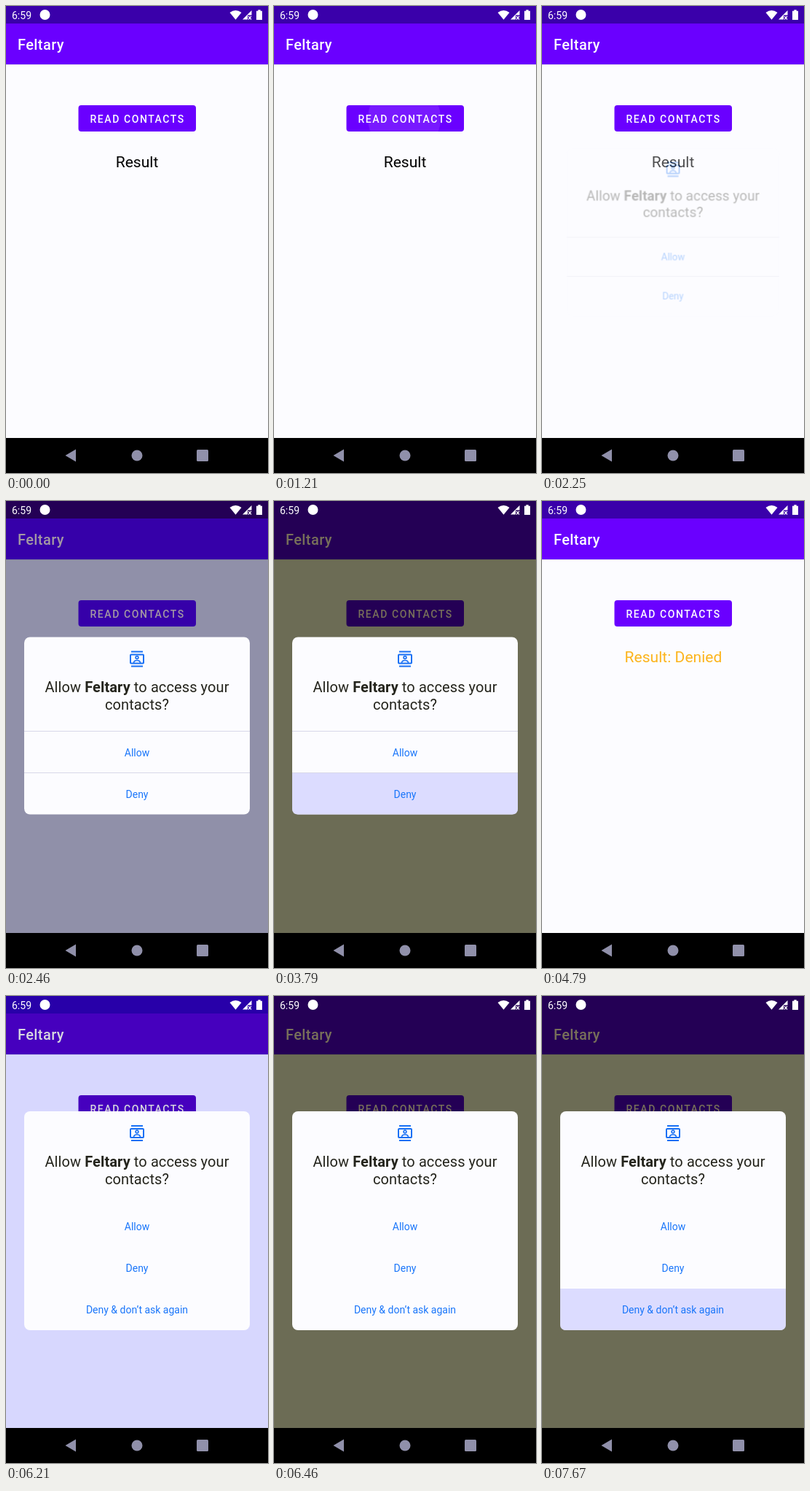
An HTML page that plays this animation: 360x640 px, repeating every 8 s.

```html
<!DOCTYPE html>
<html lang="en">
<head>
<meta charset="utf-8">
<title>Permission request</title>
<style>
  html, body { margin: 0; width: 100%; height: 100%; overflow: hidden; background: #000; }
  svg { display: block; width: 100vw; height: 100vh; font-family: Roboto, sans-serif; }
  .dialog { transform-box: fill-box; transform-origin: center; opacity: 0; }
  .middle { text-anchor: middle; }
  .title { font-size: 20px; letter-spacing: .1px; fill: #24241c; }
  .choice { font-size: 14px; fill: #1a76fa; }
  .result { font-size: 21px; letter-spacing: .03px; }
  .ripple { opacity: 0; }
</style>
</head>
<body>
<svg viewBox="0 0 360 640">
  <defs>
    <clipPath id="buttonClip"><rect x="99.5" y="136" width="161.5" height="36" rx="4"/></clipPath>
    <g id="contacts" fill="none" stroke="#1870f4" stroke-width="2">
      <path d="M172 206.5h16M172 226.5h16"/>
      <rect x="171" y="210.5" width="18" height="12" rx="1"/>
      <circle cx="180" cy="214.5" r="1.9" stroke-width="1.6"/>
      <path d="M175.5 222c0-4.6 9-4.6 9 0" stroke-width="1.6"/>
    </g>
  </defs>

  <rect class="page" width="360" height="640"/>
  <rect class="bar" y="24" width="360" height="56"/>
  <rect y="80" width="360" height="1" fill="#000" opacity=".08"/>
  <rect class="status" width="360" height="24"/>
  <text class="label" x="16" y="60" font-size="20" font-weight="500" letter-spacing=".4">Feltary</text>

  <rect class="bar" x="99.5" y="136" width="161.5" height="36" rx="4"/>
  <g clip-path="url(#buttonClip)">
    <g transform="translate(179 154)" id="buttonRipples" fill="#fff"></g>
  </g>
  <text class="label" x="115.5" y="160" font-size="14" font-weight="500" letter-spacing="1.57">READ CONTACTS</text>

  <text class="result middle" id="pending" x="180" y="220.5">Result</text>
  <text class="result middle" id="denied" x="180.5" y="220.5">Result: Denied</text>

  <g fill="#fff">
    <text x="8" y="17.5" font-size="14">6:59</text>
    <circle cx="53.5" cy="12" r="7"/>
    <path d="M307.5 9Q315.5 2.8 323.5 9L315.5 18.8Z"/>
    <path d="M325 18.5L337.5 6V12.5H332V18.5Z"/>
    <path d="M333 14l4 4.5M337 14l-4 4.5" stroke="#fff" stroke-width="1.2"/>
    <path d="M344 6.8h2.3V5.2h3.4v1.6h2.3V19h-8Z"/>
  </g>

  <g id="dialogs"></g>

  <rect y="592" width="360" height="48"/>
  <g fill="#9090aa">
    <path d="M81.5 616L96 607.5V624.5Z"/>
    <circle cx="180" cy="616" r="7.5"/>
    <rect x="262" y="608" width="16" height="16" rx="1.5"/>
  </g>
</svg>
<script>
const LOOP = 8000;
const $ = selector => document.querySelector(selector);

// steps: [time in ms, value, optional easing towards the next step]
function play(el, property, steps) {
  const last = steps[steps.length - 1];
  const full = last[0] < LOOP ? [...steps, [LOOP, last[1]]] : steps;
  const frames = full.map(([time, value, easing = 'linear']) =>
    ({ offset: time / LOOP, [property]: value, easing }));
  if (frames[0].offset > 0) frames.unshift({ ...frames[0], offset: 0, easing: 'linear' });
  el.animate(frames, { duration: LOOP, iterations: Infinity });
}

// Colours at four depths of the dialog scrim
const shades = {
  '.page': ['#fcfcff', '#d8d8ff', '#9090aa', '#6c6c55'],
  '.bar': ['#6a00ff', '#4600be', '#3600aa', '#240055'],
  '.status': ['#3a00aa', '#2800aa', '#240055', '#240055'],
  '.label': ['#fcfcff', '#d8d8e0', '#a498a4', '#78705a'],
  '#denied': ['#fcb41c', '#d89000', '#906c00', '#6c4800']
};
const depth = [
  [0, 0], [2300, 0], [2380, 1], [2460, 2], [2560, 3],
  [4070, 3], [4140, 2], [4220, 1], [4300, 0],
  [6130, 0], [6210, 1], [6290, 2], [6390, 3]
];
for (const [selector, colors] of Object.entries(shades)) {
  for (const el of document.querySelectorAll(selector))
    play(el, 'fill', depth.map(([time, level]) => [time, colors[level]]));
}

play($('#pending'), 'opacity', [[0, 1], [4060, 1], [4060, 0]]);
play($('#denied'), 'opacity', [[0, 0], [4060, 0], [4060, 1]]);

function ripple(parent, start, from, to, alpha, released) {
  parent.insertAdjacentHTML('beforeend', '<circle class="ripple" r="1"/>');
  const circle = parent.lastElementChild;
  play(circle, 'transform', [
    [start, `scale(${from})`, 'cubic-bezier(.4,0,.2,1)'], [start + 225, `scale(${to})`]
  ]);
  const fade = [[start, 0], [start + 75, alpha]];
  if (released) fade.push([start + 200, alpha], [start + 350, 0]);
  play(circle, 'opacity', fade);
}

ripple($('#buttonRipples'), 1180, 48, 84, .24, true);
ripple($('#buttonRipples'), 5240, 48, 84, .24, true);

function dialog({ id, top, choices, lines, opens, closes, pressed }) {
  const height = 129 + 57 * choices.length;
  const rowTop = i => top + 129 + 57 * i;
  const pressedTop = rowTop(choices.length - 1);
  $('#dialogs').insertAdjacentHTML('beforeend', `
    <g class="dialog" id="${id}">
      <clipPath id="${id}Clip"><path d="M25 ${pressedTop}h310v49q0 8-8 8H33q-8 0-8-8Z"/></clipPath>
      <rect x="25" y="${top}" width="310" height="${height}" rx="8" fill="#fcfcff"/>
      <g clip-path="url(#${id}Clip)">
        <g class="touch" transform="translate(180 ${pressedTop + 28.5})" fill="#d8d8ff"></g>
      </g>
      ${lines ? choices.map((_, i) =>
        `<rect x="25" y="${rowTop(i) - .5}" width="310" height="1" fill="#d8d8e8"/>`).join('') : ''}
      <use href="#contacts" y="${top - 186.5}"/>
      <text class="title middle" x="180" y="${top + 75.5}">Allow <tspan font-weight="700">Feltary</tspan> to access your</text>
      <text class="title middle" x="180" y="${top + 99.5}">contacts?</text>
      ${choices.map((text, i) =>
        `<text class="choice middle" x="180" y="${rowTop(i) + 34}">${text}</text>`).join('')}
    </g>`);
  const el = $('#' + id);
  const fade = [[opens, 0], [opens + 130, 1]];
  if (closes) fade.push([closes, 1], [closes + 120, 0]);
  play(el, 'opacity', fade);
  play(el, 'transform', [[opens, 'scale(.9)', 'ease-out'], [opens + 150, 'scale(1)']]);
  ripple(el.querySelector('.touch'), pressed, 93, 160, .9, false);
}

dialog({
  id: 'firstAsk', top: 186.5, lines: true, choices: ['Allow', 'Deny'],
  opens: 2210, closes: 4040, pressed: 3540
});
dialog({
  id: 'secondAsk', top: 158, lines: false, choices: ['Allow', 'Deny', 'Deny &amp; don’t ask again'],
  opens: 6040, pressed: 7440
});
</script>
</body>
</html>
```
